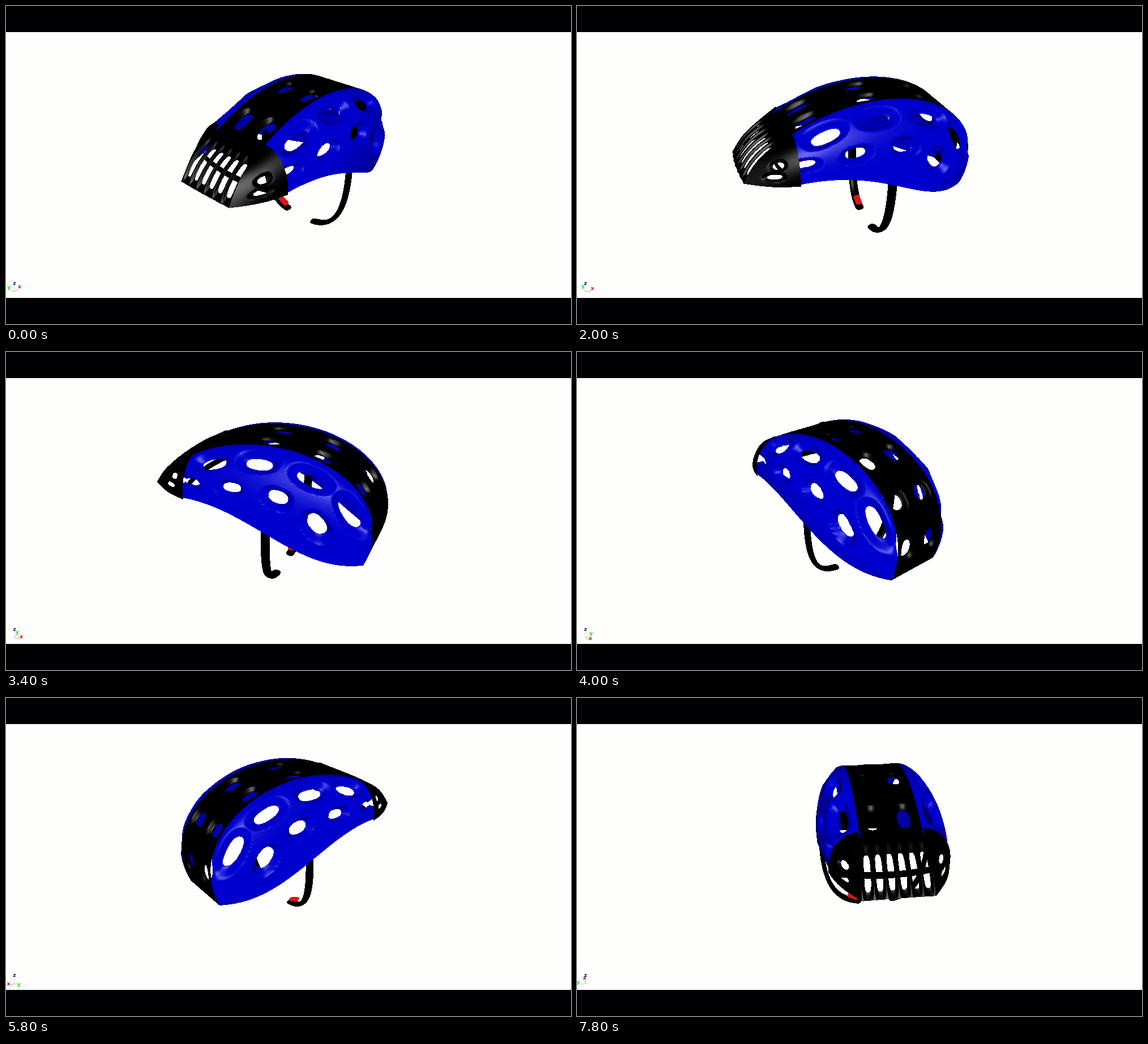
Write an HTML page with a canvas that moves like this. It is 998 px wide and 561 px high and loops after 8 s.

```html
<!DOCTYPE html>
<html lang="en">
<head>
<meta charset="utf-8">
<title>Rotating helmet</title>
<style>
html, body { margin: 0; width: 100%; height: 100%; overflow: hidden; background: #010103; }
#stage { position: absolute; left: 0; top: 0; width: 998px; height: 561px; overflow: hidden; }
#paper { position: absolute; left: 0; top: 46px; width: 998px; height: 469px; background: #fefefd; }
canvas, svg { position: absolute; left: 0; top: 0; }
canvas { left: 240px; top: 90px; }
text { font: bold 9.5px "DejaVu Sans", sans-serif; text-anchor: middle; }
line { stroke-width: .7; }
</style>
</head>
<body>
<div id="stage">
  <div id="paper"></div>
  <canvas id="view" width="520" height="340"></canvas>
  <svg width="998" height="561">
    <line id="lx" x1="15" y1="504" stroke="#d66"/>
    <line id="ly" x1="15" y1="504" stroke="#6d6"/>
    <line x1="15" y1="504" x2="15" y2="494" stroke="#ccd"/>
    <text x="15" y="492" fill="#1414a8">z</text>
    <text id="tx" fill="#d01010">x</text>
    <text id="ty" fill="#20dc20">y</text>
  </svg>
</div>
<script>
const LOOP = 8000, STEP = 200;
const DIST = 1000, CX = 500, CY = 280, MID = -28, HALF = 48;
const SIN = 0.5, COS = 0.866;
const W = 520, H = 340, OX = 240, OY = 90;
const BLUE = 0, BLACK = 1, RED = 2;
const { sin, cos, min, max, abs, hypot, floor, PI } = Math;
const lerp = (a, b, t) => a + (b - a) * t;
// Distance to the nearest multiple of a pitch.
const fromNearest = (v, pitch) => abs(v - pitch * Math.round(v / pitch));

// Camera: turntable with a fixed 30 degree elevation.
function project(x, y, z, s, c) {
  const up = y * c - x * s;
  const near = (z - 50) * SIN - up * COS;
  const k = DIST / (DIST - near);
  return [CX + (x * c + y * s) * k, CY - (z * COS + up * SIN) * k, near];
}
// Side-view pixel at a known y back to x and z.
function unproject([px, py], y) {
  const a = (CY - py) / DIST;
  const z = (a * (DIST + 50 * SIN + COS * y) - SIN * y) / (COS + SIN * a);
  const k = DIST / (DIST - (z - 50) * SIN + y * COS);
  return [(px - CX) / k, z];
}
function bezier([a, b, c, d], t) {
  const g = 1 - t;
  return a.map((v, k) => g * g * g * v + 3 * g * g * t * b[k] + 3 * g * t * t * c[k] + t * t * t * d[k]);
}

// Ring metric of a rounded hole: below 1 is open.
const ring = (a, b, pow = 2.4) => min(3, (abs(a) ** pow + abs(b) ** pow) ** (1 / pow));
function ellipse(x, y, [hx, hy, rx, ry, t]) {
  const dx = x - hx, dy = y - hy;
  return ring((dx * cos(t) + dy * sin(t)) / rx, (dy * cos(t) - dx * sin(t)) / ry);
}
function sideHoles(holes, p) {
  const [x, y] = project(p[0], MID - abs(p[1] - MID), p[2], 0, 1);
  return min(...holes.map(h => ellipse(x, y, h)));
}

function normals(P, nu, nv) {
  const row = nv + 1, at = (i, j) => P[min(nu, max(0, i)) * row + min(nv, max(0, j))];
  return P.map((_, k) => {
    const i = floor(k / row), j = k % row;
    const a = at(i + 1, j), b = at(i - 1, j), c = at(i, j + 1), d = at(i, j - 1);
    const [ux, uy, uz] = a.map((v, m) => v - b[m]), [vx, vy, vz] = c.map((v, m) => v - d[m]);
    const n = [uy * vz - uz * vy, uz * vx - ux * vz, ux * vy - uy * vx];
    const l = hypot(...n) || 1;
    return n.map(v => v / l);
  });
}
const meshes = [];
function mesh(nu, nv, mat, pos, hole = () => 3, depth = 0) {
  const P = [], h = [];
  for (let i = 0; i <= nu; i++) for (let j = 0; j <= nv; j++) {
    const u = i / nu, w = j / nv, p = pos(u, w);
    P.push(p);
    h.push(hole(u, w, p));
  }
  let N = normals(P, nu, nv), sum = 0;
  P.forEach((p, k) => sum += p[0] * N[k][0] + (p[1] - MID) * N[k][1] + (p[2] - 40) * N[k][2]);
  const out = sum < 0 ? -1 : 1;
  // Sink the rim of each hole so it gets a wall.
  const sunk = P.map((p, k) => {
    const e = min(1, max(0, (h[k] - 1) / 0.65)), d = depth * out * (1 - e * e * (3 - 2 * e));
    return p.map((v, m) => v - N[k][m] * d);
  });
  N = normals(sunk, nu, nv).map(n => n.map(v => v * out));
  meshes.push({ nu, nv, mat, P: sunk, N, h });
}

// Shell: band edge and lower rim, as seen from the side.
const edge = [[335, 210], [510, 116], [755, 190], [666, 343]];
const rim = [[333, 291], [493, 283], [574, 380], [666, 343]];
const bulge = u => 58 * max(0, 1 - ((u - 0.35) / 0.65) ** 2) ** 0.8;
const TUCK = 1.75;
const edgeAt = u => unproject(bezier(edge, u), MID - HALF);
const rimAt = u => unproject(bezier(rim, u), MID - HALF - bulge(u) * sin(TUCK));
function shell(u, w, side) {
  const a = w * TUCK, g = (1 - cos(a)) / (1 - cos(TUCK));
  const p = edgeAt(u), q = rimAt(u);
  return [lerp(p[0], q[0], g), MID + side * (HALF + bulge(u) * sin(a)), lerp(p[1], q[1], g)];
}

// Four vents on a path, long axis along it.
function ventRow(path, rx, ry, grow) {
  return [0, 1, 2, 3].map(i => {
    const t = i / 3, p = bezier(path, t), a = bezier(path, t - 0.01), b = bezier(path, t + 0.01);
    return [...p, rx, ry + grow * i, Math.atan2(b[1] - a[1], b[0] - a[0])];
  });
}
const vents = [
  ...ventRow([[391, 212], [472, 188], [619, 190], [659, 261]], 27, 13, 0),
  ...ventRow([[349, 260], [430, 265], [555, 231], [605, 294]], 19, 7, 2.6)
];
for (const side of [-1, 1]) {
  mesh(140, 50, BLUE, (u, w) => shell(u, w, side), (u, w, p) => sideHoles(vents, p), 14);
}

// Central band with evenly spaced pairs of slots.
mesh(150, 50, BLACK, (u, w) => {
  const [x, z] = edgeAt(u);
  return [x, MID + HALF * (2 * w - 1), z];
}, (u, w) => ring(fromNearest(u - 0.07, 0.205) / 0.034, (abs(2 * w - 1) * HALF - 25) / 10), 8);

// Face cage: slotted front and two ears that overlap the shell.
const [topX, topZ] = edgeAt(0);
const front = (s, t) => {
  const b = 9 * sin(PI * t) + 5 * t * (1 - s * s);
  return [lerp(topX, -220, t) - b * 0.77, MID + s * lerp(HALF + 1, 54, t), lerp(topZ + 1, 55, t) + b * 0.63];
};
mesh(100, 40, BLACK, (u, w) => front(2 * u - 1, w), (u, w) => {
  const v = abs(2 * u - 1) * 54;
  return ring(fromNearest(v - 9, 18) / 5, (w - 0.57) / 0.3, 4);
}, 4);
const earHoles = [[310, 253, 8, 6, 0], [303, 271, 11, 4, 0.2]];
for (const side of [-1, 1]) {
  mesh(34, 34, BLACK, (u, w) => {
    const a = front(side, w), r = shell(0.02, w, side);
    r[1] += side * 2;
    r[2] += 2 - 4 * w;
    const b = side * 6 * sin(PI * u) * w;
    return a.map((v, m) => lerp(v, r[m], u) + (m === 1 ? b : 0));
  }, (u, w, p) => sideHoles(earHoles, p), 4);
}
// Brow bar behind the cage.
mesh(30, 4, BLACK, (u, w) => {
  const s = 2 * u - 1;
  return [topX - 14 * (1 - s * s), MID + 84 * s, 54 + 12 * w];
});

// Straps are flat tubes, broad along x.
function tube(path, mat, wide, thick) {
  mesh(40, 16, mat, (u, w) => {
    const p = bezier(path, u), a = bezier(path, u - 0.01), b = bezier(path, u + 0.01);
    const dy = b[1] - a[1], dz = b[2] - a[2], l = hypot(dy, dz), f = -w * 2 * PI;
    const end = Math.sqrt(max(0, 1 - max(0, (u - 0.94) / 0.06) ** 2));
    const q = thick * end * sin(f) / l;
    return [p[0] + wide * end * cos(f), p[1] - dz * q, p[2] + dy * q];
  });
}
const strap = [[10, 97, 40], [6, 99, -70], [0, 65, -92], [0, 26, -96]];
for (const side of [-1, 1]) tube(strap.map(([x, v, z]) => [x, MID + side * v, z]), BLACK, 8, 4);
tube([[0, 22, -80], [0, 17, -83], [0, 12, -86], [0, 6, -88]], RED, 6, 3.5);

const ctx = view.getContext('2d');
const image = ctx.createImageData(W, H), pix = new Uint32Array(image.data.buffer);
const depths = new Float32Array(W * H);

// Headlight shading: f is the cosine towards the viewer, negative inside.
function shade(mat, f) {
  let r = 0, g = 0, b = 0;
  const shine = f > 0 ? min(1, f) ** 30 : 0;
  if (mat === BLUE) {
    r = g = 105 * shine;
    b = f > 0 ? min(206, 85 + 180 * f) + 35 * shine : min(175, 60 - 200 * f);
  } else if (mat === BLACK) r = g = b = 115 * shine;
  else { r = 225; g = b = 20; }
  return (255 << 24 | b << 16 | g << 8 | r) >>> 0;
}

function triangle(a, b, c, mat) {
  if (a.h < 1 && b.h < 1 && c.h < 1) return;
  const area = (b.x - a.x) * (c.y - a.y) - (b.y - a.y) * (c.x - a.x);
  if (!area) return;
  const x0 = max(0, Math.ceil(min(a.x, b.x, c.x))), x1 = min(W - 1, floor(max(a.x, b.x, c.x)));
  const y0 = max(0, Math.ceil(min(a.y, b.y, c.y))), y1 = min(H - 1, floor(max(a.y, b.y, c.y)));
  for (let y = y0; y <= y1; y++) for (let x = x0; x <= x1; x++) {
    const k = ((b.x - x) * (c.y - y) - (b.y - y) * (c.x - x)) / area;
    const l = ((c.x - x) * (a.y - y) - (c.y - y) * (a.x - x)) / area, m = 1 - k - l;
    if (k < 0 || l < 0 || m < 0) continue;
    if (k * a.h + l * b.h + m * c.h < 1) continue;
    const z = k * a.z + l * b.z + m * c.z, i = y * W + x;
    if (z <= depths[i]) continue;
    depths[i] = z;
    pix[i] = shade(mat, k * a.f + l * b.f + m * c.f);
  }
}

function drawHelmet(s, c) {
  pix.fill(0);
  depths.fill(-1e9);
  const vx = COS * s, vy = -COS * c;
  for (const { nu, nv, mat, P, N, h } of meshes) {
    const v = P.map((p, k) => {
      const [x, y, z] = project(p[0], p[1], p[2], s, c), n = N[k];
      return { x: x - OX, y: y - OY, z, h: h[k], f: n[0] * vx + n[1] * vy + n[2] * SIN };
    });
    for (let i = 0; i < nu; i++) for (let j = 0; j < nv; j++) {
      const k = i * (nv + 1) + j, q = k + nv + 1;
      triangle(v[k], v[q], v[k + 1], mat);
      triangle(v[q], v[q + 1], v[k + 1], mat);
    }
  }
  ctx.putImageData(image, 0, 0);
}

function drawAxes(s, c) {
  const put = (name, dx, dy) => {
    const t = document.getElementById('t' + name), l = document.getElementById('l' + name);
    t.setAttribute('x', 15 + 13 * dx);
    t.setAttribute('y', 503 + 6.5 * dy);
    l.setAttribute('x2', 15 + 11 * dx);
    l.setAttribute('y2', 504 + 5.5 * dy);
  };
  put('x', c, s);
  put('y', s, -c);
}

// Turntable angle in degrees at a few times, joined smoothly.
const turn = [[0, -48], [1200, -35], [2800, 0], [4000, 49], [5000, 98], [6600, 189], [8000, 275]];
function angleAt(t) {
  const slope = i => {
    const a = turn[max(0, i - 1)], b = turn[min(turn.length - 1, i + 1)];
    return (b[1] - a[1]) / (b[0] - a[0]);
  };
  const i = turn.findIndex((k, n) => t < turn[n + 1][0]);
  const [t0, a0] = turn[i], [t1, a1] = turn[i + 1], d = t1 - t0, f = (t - t0) / d, g = 1 - f;
  return a0 * g * g * (1 + 2 * f) + a1 * f * f * (3 - 2 * f) + d * f * g * (slope(i) * g - slope(i + 1) * f);
}

let shown = -1;
function frame() {
  const step = floor(performance.now() % LOOP / STEP);
  if (step !== shown) {
    shown = step;
    const a = angleAt(step * STEP) * PI / 180;
    drawHelmet(sin(a), cos(a));
    drawAxes(sin(a), cos(a));
  }
  requestAnimationFrame(frame);
}
frame();
</script>
</body>
</html>
```
